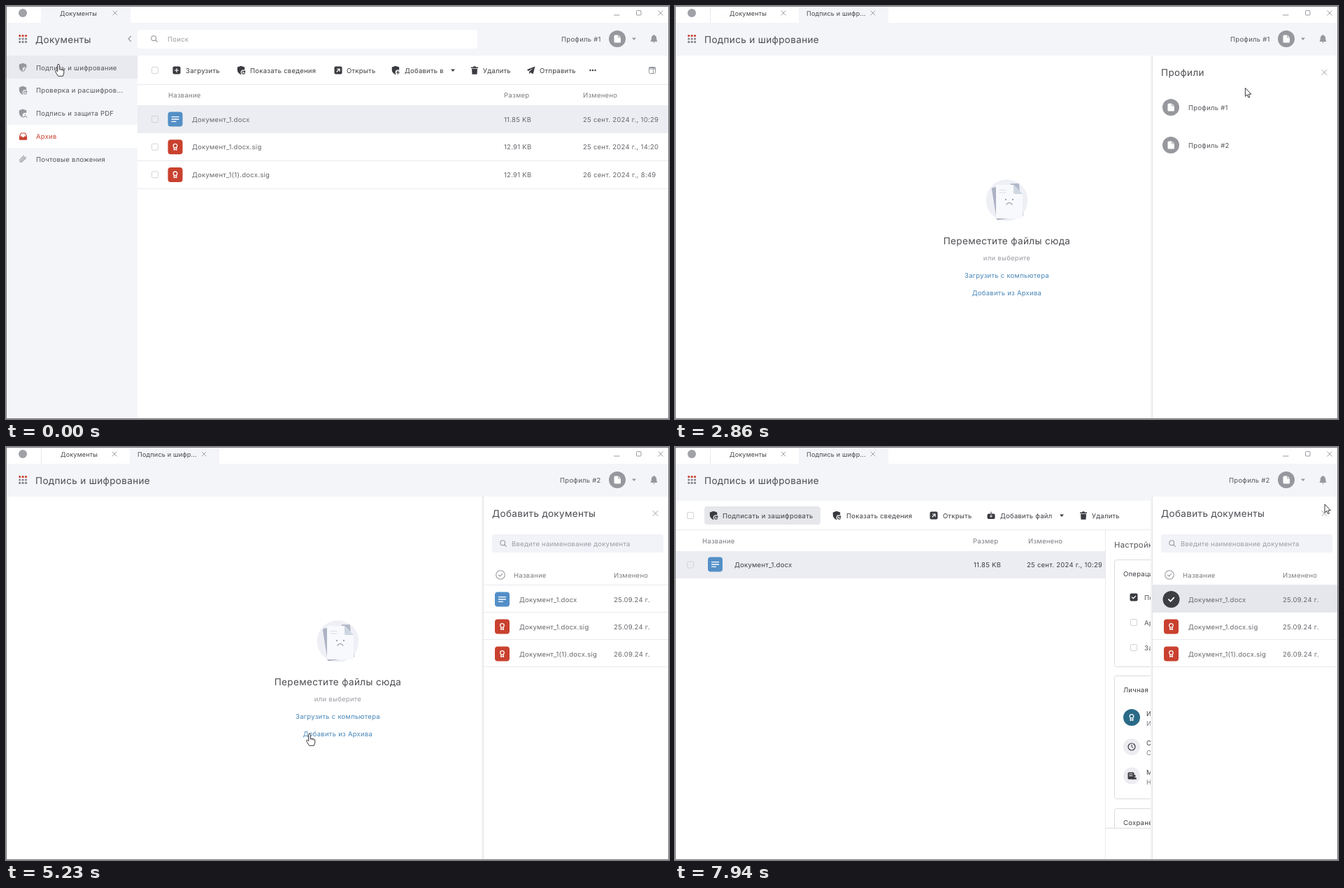
An HTML page that plays this animation: 948 by 591 pixels, repeating every 8 s.

```html
<!DOCTYPE html>
<html lang="ru">
<head>
<meta charset="utf-8">
<title>Документы</title>
<style>
html, body { margin: 0; width: 100%; height: 100%; overflow: hidden; background: #fff; }
svg { display: block; width: 948px; height: 591px; }
text { font: 400 9.5px Inter, sans-serif; letter-spacing: .26px; fill: #55565b; text-rendering: geometricPrecision; white-space: pre; }
.title { font-size: 13.5px; letter-spacing: .36px; fill: #4b4c51; }
.tab { font-size: 9.1px; letter-spacing: .18px; fill: #44454a; }
.sub { font-size: 11.3px; }
.muted { fill: #7c7d83; }
.pale { fill: #9b9ca3; }
.dark { fill: #3d3e43; }
.cell { fill: #66676c; }
.red { fill: #c9412f; }
.link { fill: #4585b8; }
.mid { text-anchor: middle; }
.tip { font-weight: 700; font-size: 8.7px; letter-spacing: .1px; fill: #fff; }
</style>
</head>
<body>
<svg id="stage" viewBox="0 0 948 591"></svg>
<script>
const BAR = '#f4f5f9', INK = '#3a3b40', GREY = '#97989e', RED = '#c9412f', BLUE = '#538fc7', RULE = '#e9eaee';

const text = (x, y, s, cls = '') => `<text x="${x}" y="${y + 3.5}" class="${cls}">${s}</text>`;
const title = (x, y, s) => `<text x="${x}" y="${y + 5}" class="title">${s}</text>`;
const rect = (x, y, w, h, fill, r = 0, extra = '') =>
  `<rect x="${x}" y="${y}" width="${w}" height="${h}" rx="${r}" fill="${fill}" ${extra}/>`;
const disc = (x, y, r, fill) => `<circle cx="${x}" cy="${y}" r="${r}" fill="${fill}"/>`;
const line = (d, color, w = 1) =>
  `<path d="${d}" fill="none" stroke="${color}" stroke-width="${w}" stroke-linecap="round" stroke-linejoin="round"/>`;
const fill = (d, color) => `<path d="${d}" fill="${color}"/>`;
const at = (x, y, s) => `<g transform="translate(${x} ${y})">${s}</g>`;
const group = (id, s) => `<g id="${id}" style="display:none">${s}</g>`;
const hRule = (x, y, w) => rect(x, y, w, 1, RULE);
const box = (x, y) => rect(x - 4.5, y - 4.5, 9, 9, 'none', 1.5, 'stroke="#d3d4d8"');
const cross = (x, y, r = 3, c = GREY) => at(x, y, line(`M${-r} ${-r}L${r} ${r}M${r} ${-r}L${-r} ${r}`, c, .9));
const caret = (x, y, c = INK) => at(x, y, fill('M-3-1.5H3L0 2z', c));

const shield = (x, y, c, bg, mark) => at(x, y,
  fill('M0-6.2 5.2-4.4V0Q4.7 4 0 6.2-4.7 4-5.2 0V-4.4z', c) + disc(3.4, 3, 3.8, bg) + line(mark, c, 1.2));
const MARK = {
  pen: 'M1.5 5 5-1.5',
  turn: 'M5 1.6A2.1 2.1 0 1 0 5.4 4M5.6.8V2.4H4',
  person: 'M1.2 5.6Q3.4 2.6 5.8 5.6M3.4 1.4V2',
  plus: 'M1.2 3H5.6M3.4.8V5.2'
};
const square = (x, y, mark) => at(x, y, rect(-5.5, -5.5, 11, 11, INK, 2) + line(mark, '#fff', 1.2));
const PLUS = 'M-2.5 0H2.5M0-2.5V2.5', OUT = 'M-2 2 2-2M-1.5-2H2V1.5';
const trash = (x, y) => at(x, y, fill('M-5-4.5H-2L-1.3-5.8H1.3L2-4.5H5V-3H-5zM-4-2.2H4L3.5 5.8H-3.5z', INK));
const search = (x, y) => at(x, y, `<circle cx="-.8" cy="-.8" r="3.4" fill="none" stroke="${GREY}" stroke-width="1.1"/>` + line('M1.8 1.8 4.3 4.3', GREY, 1.2));
const grid = () => Array.from({length: 9}, (_, i) =>
  disc(19.7 + i % 3 * 4.4, 42.6 + (i / 3 | 0) * 4.4, 1.6, i < 3 ? RED : '#84858b')).join('');
const ribbon = c => `<circle cy="-1.6" r="2.8" fill="none" stroke="${c}" stroke-width="1.3"/>` + line('M-1.8 1V4.4L0 3.3 1.8 4.4V1', c, 1.2);
const fileIcon = (x, y, signed) => at(x, y, rect(-10.5, -10.5, 21, 21, signed ? RED : BLUE, 4) +
  (signed ? ribbon('#fff') : line('M-5-3.3H5M-5 0H5M-5 3.3H1', '#fff', 1.3)));
const check = (x, y, c) => at(x, y, disc(0, 0, 12, c) + line('M-3.6.2-1 2.8 3.8-2.4', '#fff', 1.8));
const avatar = (x, y, r = 12) => at(x, y, disc(0, 0, r, GREY) + fill('M-4.5-4Q-4.5-5.5-3-5.5H1.5L5-2V4Q5 5.5 3.5 5.5H-3Q-4.5 5.5-4.5 4z', '#fff') + line('M1.5-5V-2H4.5', GREY, .8));

const FILES = ['Документ_1.docx', 'Документ_1.docx.sig', 'Документ_1(1).docx.sig'];

function archivePage() {
  const nav = [['Подпись и шифрование', 'pen'], ['Проверка и расшифров...', 'turn'], ['Подпись и защита PDF', 'person'], ['Архив'], ['Почтовые вложения']];
  const sizes = ['11.85 KB', '12.91 KB', '12.91 KB'];
  const dates = ['25 сент. 2024 г., 10:29', '25 сент. 2024 г., 14:20', '26 сент. 2024 г., 8:49'];
  let s = rect(50, 1, 128, 24, BAR) + rect(1, 24, 946, 47, BAR) + rect(1, 71, 187, 519, BAR) +
    text(77, 10, 'Документы', 'tab') + cross(156, 10) + title(42, 47.5, 'Документы') + line('M178.5 43.5 175 47 178.5 50.5', GREY, 1.2) +
    rect(188, 34, 486, 27, '#fff', 4) + search(212, 47) + text(231, 47, 'Поиск', 'pale') +
    rect(1, 71, 187, 33, '#e9eaef') + rect(1, 170, 187, 33, '#fff');
  nav.forEach(([name, mark], i) => {
    const y = 88 + i * 32.8;
    s += text(43, y, name, i == 3 ? 'red' : '');
    if (mark) s += shield(24, y, GREY, i ? BAR : '#e9eaef', MARK[mark]);
  });
  s += at(24.5, 186.5, line('M-5 0-3-4.5H3L5 0V4.5H-5zM-5 .5H-2Q0 3.5 2 .5H5', RED, 1.1) + fill('M-5 .5H-2Q0 3.5 2 .5H5V5H-5z', RED)) +
    at(24.5, 219, line('M-3 2.5 2-2.5Q3.2-3.2 3.6-2 3.7-1 3-.5L-2 4.2Q-4.5 5-4.8 2.2-4.8 1-4 .2L1-4.5', GREY, 1.1));

  s += box(213, 92) + square(244, 92, PLUS) + text(257, 92, 'Загрузить', 'dark') +
    shield(336, 92, INK, '#fff', MARK.turn) + text(349, 92, 'Показать сведения', 'dark') +
    square(475, 92, OUT) + text(487, 92, 'Открыть', 'dark') +
    shield(557, 92, INK, '#fff', MARK.plus) + text(570, 92, 'Добавить в', 'dark') + caret(639, 92) +
    trash(670, 92) + text(682, 92, 'Удалить', 'dark') +
    at(751, 92, fill('M-6-1 5.5-5.5 2.5 5.5-1 3-2.5 5.5-3 2 3-3-4.2 1z', INK)) + text(763, 92, 'Отправить', 'dark') +
    [835.5, 839, 842.5].map(x => disc(x, 92, 1.2, INK)).join('') +
    at(924, 92, rect(-4.5, -4.5, 9, 9, 'none', 1, `stroke="${GREY}"`) + line('M-4.5-2H4.5M-4.5-3.5H4.5M1.5-2V4', GREY));
  s += hRule(188, 112, 759) + text(232, 127.5, 'Название', 'muted') + text(712, 127.5, 'Размер', 'muted') + text(825, 127.5, 'Изменено', 'muted') +
    rect(188, 142, 759, 40, '#ecedf2');
  FILES.forEach((name, i) => {
    const y = 162 + i * 39.7;
    s += box(213, y) + fileIcon(242, y, i) + text(266, y, name, 'cell') + text(712, y, sizes[i], 'cell') + text(825, y, dates[i], 'cell');
    if (i) s += hRule(188, Math.round(y + 19.3), 759);
  });
  return s;
}

const signHead = () => rect(50, 1, 1, 23, RULE) + rect(177, 1, 128, 24, BAR) + rect(1, 24, 946, 47, BAR) +
  text(78, 10, 'Документы', 'tab') + cross(155, 10) + text(188, 10, 'Подпись и шифр...', 'tab') + cross(283, 10) +
  title(42, 47.5, 'Подпись и шифрование');

function emptyState() {
  return disc(474.5, 278, 29.8, '#eff0f6') +
    at(474, 280, `<g transform="rotate(-9)">${rect(-18, -23, 36, 47, '#adb2c4', 2)}</g>` +
      fill('M6-26 18-26 19-14 24 20 20 24 10 22z', '#b4b9c9') +
      fill('M-15-22Q-15-24-13-24H10L23-11V22Q23 24 21 24H-13Q-15 24-15 22z', '#f8f9fc') +
      fill('M10-24V-13Q10-11 12-11H23z', '#ced7e1') +
      line('M-10-16.5H-1M-10-13H-1', '#dadde6') +
      disc(-1, -3, 1, '#85879a') + disc(9, -3, 1, '#85879a') + line('M0 4Q4-1 8 4', '#85879a', 1.2)) +
    `<text x="474.5" y="341" class="title mid">Переместите файлы сюда</text>` +
    text(474.5, 360, 'или выберите', 'pale mid') + text(474.5, 385, 'Загрузить с компьютера', 'link mid') +
    text(474.5, 410.5, 'Добавить из Архива', 'link mid');
}

function signTable() {
  const card = (y, h) => rect(628.5, y + .5, 320, h, '#fff', 3, 'stroke="#d9dade"');
  const person = (y, bg, icon, a, b) => at(653, y, disc(0, 0, 12, bg) + icon) + text(674, y - 5.5, a, 'dark') + text(674, y + 8.5, b, 'muted');
  return rect(1, 71, 946, 6, BAR) + box(22, 98) + rect(42, 85, 166, 26, '#e6e7eb', 4) +
    shield(55, 98, INK, '#e6e7eb', MARK.turn) + text(68, 98, 'Подписать и зашифровать', 'dark') +
    shield(231, 98, INK, '#fff', MARK.turn) + text(245, 98, 'Показать сведения', 'dark') +
    square(370, 98, OUT) + text(383, 98, 'Открыть', 'dark') +
    at(452, 98, rect(-5.5, -2.5, 11, 7.5, INK, 2) + line('M0-5V2M-2 .5 0 2.5 2 .5', INK) + line('M0-1V2M-1.6.8 0 2.4 1.6.8', '#fff')) +
    text(465, 98, 'Добавить файл', 'dark') + caret(553, 98) + trash(584, 98) + text(596, 98, 'Удалить', 'dark') +
    hRule(1, 118, 682) + text(39, 134, 'Название', 'muted') + text(426, 134, 'Размер', 'muted') + text(505, 134, 'Изменено', 'muted') +
    rect(1, 149, 615, 39, '#ecedf2') + box(22, 168.5) + fileIcon(57.5, 168, false) + text(85, 168.5, FILES[0], 'dark') +
    text(427, 168.5, '11.85 KB', 'dark') + text(503, 168.5, '25 сент. 2024 г., 10:29', 'dark') +
    rect(610, 149, 6, 39, '#ecedf2') + rect(616, 119, 332, 471, '#fff') + rect(615, 119, 1, 471, RULE) +
    text(628, 140.5, 'Настройки', 'sub') +
    card(161, 153) + text(641, 181, 'Операции', 'dark') +
    at(656, 215, rect(-5.5, -5.5, 11, 11, INK, 2) + line('M-2.5 0-.7 1.8 2.6-1.6', '#fff', 1.3)) + box(656, 251) + box(656, 287) +
    text(671, 215, 'Подпись') + text(671, 251, 'Архивация') + text(671, 287, 'Защита') +
    card(327, 176) + text(641, 347, 'Личная подпись', 'dark') +
    person(387, '#2a6a87', ribbon('#fff'), 'Имя', 'Имя') +
    person(429, '#ececf1', `<circle r="5" fill="none" stroke="${INK}" stroke-width="1.2"/>` + line('M0-2.7V0L2 1.3', INK), 'Статус', 'Слово') +
    person(470.5, '#ececf1', rect(-5.5, -5, 9, 10, INK, 1.5) + line('M-3.5-2.5H1M-3.5 0H1', '#fff', .9) + disc(4, 0, 1.6, INK) + fill('M1 5Q1 2 4 2T7 5z', INK), 'МЧД', 'Нет') +
    card(517, 40) + text(641, 537, 'Сохранение', 'dark') + rect(616, 545, 332, 45, '#fff') + rect(616, 545, 332, 1, '#dcdde1');
}

const panel = (heading, body) => rect(680, 71, 3, 519, '#f4f4f6') + rect(682, 71, 1, 519, '#e4e5e8') + rect(683, 71, 264, 519, '#fff') +
  title(695, 95, heading) + cross(928.5, 95, 3.5) + body;

function docsPanel() {
  const days = ['25.09.24 г.', '25.09.24 г.', '26.09.24 г.'];
  let s = rect(695, 125, 245, 26, '#f2f3f8', 3) + search(711, 138) + text(723, 138, 'Введите наименование документа', 'pale') +
    at(707, 183, `<circle r="6.3" fill="none" stroke="${GREY}" stroke-width="1.1"/>` + line('M-2.5 0-.6 1.9 2.7-1.7', GREY, 1.1)) +
    text(726, 183.5, 'Название', 'muted') + text(869, 183.5, 'Изменено', 'muted') +
    group('hover', rect(683, 198, 264, 39, '#f9f9fb')) + group('chosen', rect(683, 198, 264, 39, '#e5e7ec')) + hRule(683, 197, 264);
  FILES.forEach((name, i) => {
    const y = 218 + i * 39;
    s += (i ? fileIcon(709.5, y, true) : group('plainIcon', fileIcon(709.5, y, false)) + group('hoverIcon', check(709.5, y, '#9a9ba2')) + group('chosenIcon', check(709.5, y, '#3d3e42'))) +
      text(734, y + .5, name, 'cell') + text(869, y + .5, days[i], 'cell') + hRule(683, y + 18, 264);
  });
  return s;
}

const profilePanel = () => group('profileHover', rect(683, 178, 264, 43, '#f4f5f9')) +
  [1, 2].map(n => avatar(709, 91 + n * 54) + text(734, 91 + n * 54, 'Профиль #' + n)).join('');

const HAND = 'M-1.3 1.6a1.3 1.3 0 0 1 2.6 0V7L6 8Q7.8 8.4 7.8 10V13L6.4 17.3H-.4L-4 11.8Q-5 10-3.8 9.4-2.8 9-1.3 11z';
const ARROW = 'M0 0V12L2.8 9.5 4.6 13.7 6.5 12.9 4.7 8.8H8.5z';
const pointer = (d, extra = '') => `<path d="${d}" fill="#fff" stroke="#22222a" stroke-width=".9" stroke-linejoin="round"/>` + extra;

stage.innerHTML = rect(0, 0, 948, 591, '#fff') +
  group('archive', archivePage()) +
  group('sign', signHead() + group('empty', emptyState()) + group('table', signTable())) +
  disc(24, 10, 6, '#a0a2a8') + grid() +
  line('M869.5 13H877', GREY) + rect(901.5, 6.5, 6.5, 6.5, 'none', 1, `stroke="${GREY}"`) + cross(936, 10, 3.3) +
  group('profile1', text(794, 47.5, 'Профиль #1')) + group('profile2', text(792, 47.5, 'Профиль #2')) +
  avatar(874, 47) + caret(898, 47, GREY) +
  at(926.5, 47, fill('M-5 4Q-3.6 2-3.6-1.5-3.2-4.6-.7-5V-6H.7V-5Q3.2-4.6 3.6-1.5 3.6 2 5 4zM-1.5 4.8H1.5L0 6.3z', GREY)) +
  group('profiles', panel('Профили', profilePanel())) + group('docs', panel('Добавить документы', docsPanel())) +
  group('tooltip', rect(198, 78, 123, 19, '#212226', 2) + text(204, 87.5, 'Подпись и шифрование', 'tip')) +
  rect(.5, .5, 947, 590, 'none', 0, 'stroke="#77787b"') +
  `<g id="cursor">${group('click', disc(0, 0, 9, 'rgba(130,130,145,.3)'))}${group('hand', pointer(HAND, line('M1.3 7V9M3.6 7.6V9.4M5.8 8.2V9.8', '#22222a', .5)))}${group('arrow', pointer(ARROW))}</g>`;

// start ms, number of steps, ms per step, Bezier points
const MOVES = [
  [0, 1, 1, [[75, 83], [75, 83], [75, 83], [75, 83]]],
  [1710, 11, 68, [[75, 83], [370, 35], [801, 12], [821, 58]]],
  [2530, 11, 68, [[821, 58], [822, 95], [808, 150], [804, 199]]],
  [3810, 11, 69, [[804, 199], [620, 145], [443, 150], [430, 410]]],
  [4830, 1, 1, [[434, 410], [434, 410], [434, 410], [434, 410]]],
  [5550, 10, 67.7, [[434, 410], [520, 350], [660, 265], [703, 224]]],
  [7230, 11, 71, [[703, 224], [745, 155], [840, 66], [929, 82]]]
];
const CLICKS = [[790, 920], [3340, 3410], [4970, 5030], [6300, 6360]];
const bezier = (p, u, k) => (1 - u) ** 3 * p[0][k] + 3 * u * (1 - u) ** 2 * p[1][k] + 3 * u * u * (1 - u) * p[2][k] + u ** 3 * p[3][k];
const show = (id, on) => document.getElementById(id).style.display = on ? '' : 'none';

function draw(t) {
  const within = (a, b) => t >= a && t < b;
  show('archive', t < 1050);
  show('sign', t >= 1050);
  show('empty', t < 6630);
  show('table', t >= 6630);
  show('profile1', t < 3340);
  show('profile2', t >= 3340);
  show('profiles', within(2530, 3410));
  show('profileHover', t >= 3140);
  show('docs', t >= 5230);
  for (const id of ['hover', 'hoverIcon']) show(id, within(6155, 6630));
  for (const id of ['chosen', 'chosenIcon']) show(id, t >= 6630);
  show('plainIcon', t < 6155);
  show('tooltip', within(70, 1050));
  tooltip.style.opacity = Math.min(1, (Math.floor((t - 70) / 60) + 1) / 3);

  const [start, steps, dt, path] = MOVES.filter(m => t >= m[0]).pop();
  const u = Math.min(1, (Math.floor((t - start) / dt + .02) + 1) / steps);
  const isHand = t < 1050 || (start > 0 && start < 7000 && u === 1);
  cursor.setAttribute('transform', `translate(${bezier(path, u, 0)} ${bezier(path, u, 1)})`);
  show('hand', isHand);
  show('arrow', !isHand);
  show('click', CLICKS.some(c => within(...c)));
}

function tick() {
  draw(performance.now() % 8000);
  requestAnimationFrame(tick);
}
tick();
</script>
</body>
</html>
```
